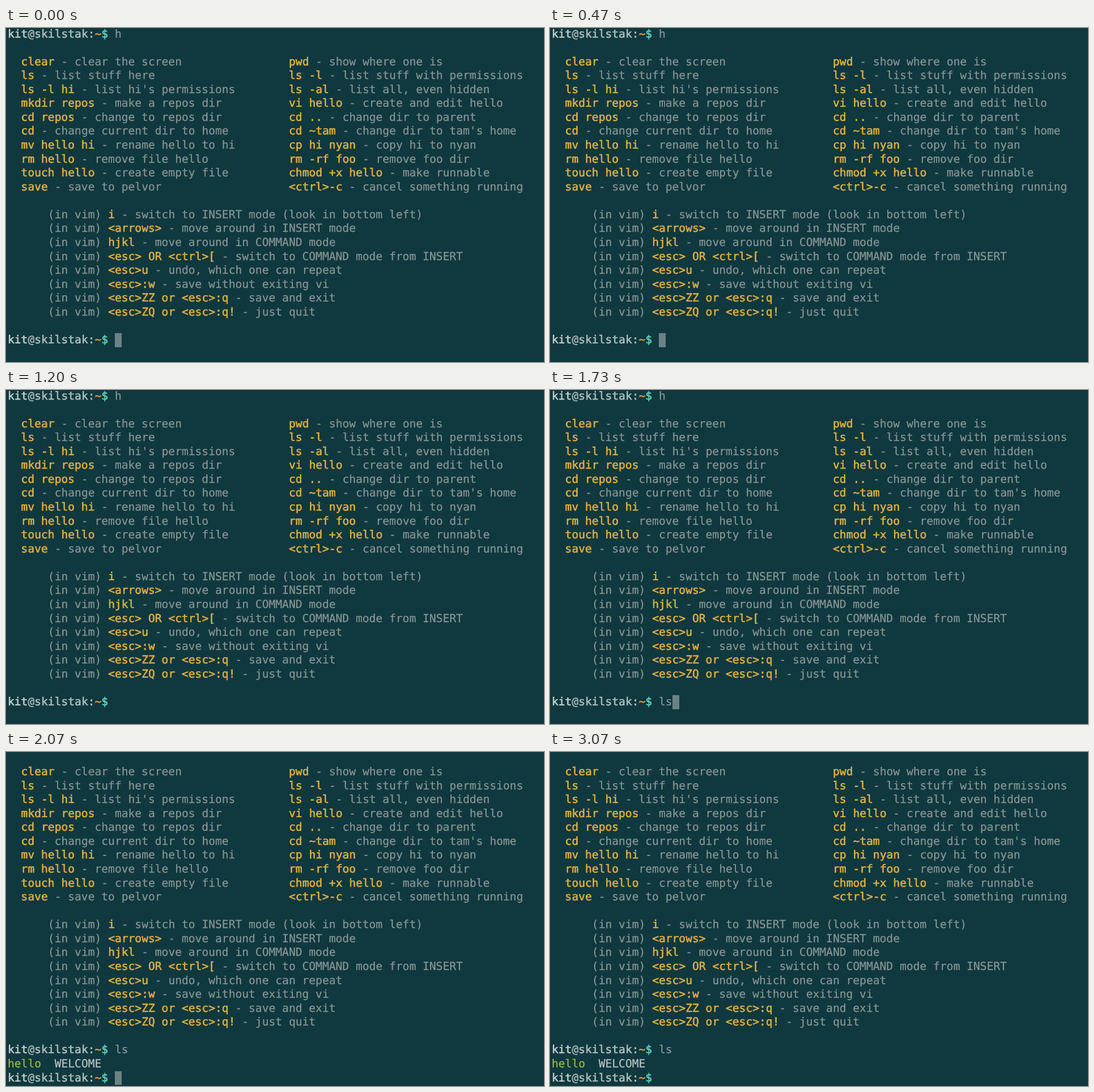
Recreate the animation shown at these times as an HTML page. Size 949 by 590 pixels, loop 3140 ms.

```html
<!DOCTYPE html>
<html lang="en">
<head>
<meta charset="utf-8">
<title>Terminal help</title>
<style>
  :root { --row: 24.57px; --col: 11.81px; --loop: 3140ms step-end infinite; }
  html, body { margin: 0; width: 100%; height: 100%; overflow: hidden; background: #10383f; }
  .stage { position: absolute; inset: 0; overflow: clip; contain: strict; }
  .screen {
    position: absolute; left: 3px; top: -1.5px; width: 940px; height: 580px;
    color: #86959a;
    color: #879694;
    font: 19.615px/var(--row) "DejaVu Sans Mono", "Liberation Mono", monospace;
    font-variant-ligatures: none;
    text-rendering: geometricPrecision;
    -webkit-text-stroke: .25px currentColor;
    animation: scroll var(--loop);
  }
  pre {
    position: absolute; margin: 0; font: inherit;
    left: calc(var(--x, 0) * var(--col));
    top: calc(var(--y, 0) * var(--row));
  }
  b { font-weight: 400; color: #dfb03f; -webkit-text-stroke: .6px currentColor; }
  .user { color: #c3d1cd; }
  .at { color: #9fb0ad; }
  .host { color: #afbfbb; }
  .dir { color: #dba03c; }
  .sign { color: #5fd9bf; }
  .exe { color: #98ba3c; -webkit-text-stroke-color: #98ba3c; }
  .file { color: #b9c4bf; -webkit-text-stroke-color: #b9c4bf; }
  .cursor {
    position: absolute; width: 12px; height: 24.5px; background: #6b8285;
    animation: blink var(--loop), move var(--loop);
  }
  .key1 { animation: key1 var(--loop); }
  .key2 { animation: key2 var(--loop); }
  .output { animation: output var(--loop); }

  /* ms: 930 cursor off, 1530 first key, 1670 second key, 1800 enter, 2730 cursor off */
  @keyframes blink {
    0%, 48.726% { visibility: visible; }
    29.618%, 86.943%, 100% { visibility: hidden; }
  }
  @keyframes move {
    0% { left: calc(16 * var(--col)); top: calc(22 * var(--row)); }
    48.726% { left: calc(17 * var(--col)); top: calc(22 * var(--row)); }
    53.185% { left: calc(18 * var(--col)); top: calc(22 * var(--row)); }
    57.325%, 100% { left: calc(16 * var(--col)); top: calc(24 * var(--row)); }
  }
  @keyframes key1 { 0% { visibility: hidden; } 48.726%, 100% { visibility: visible; } }
  @keyframes key2 { 0% { visibility: hidden; } 53.185%, 100% { visibility: visible; } }
  @keyframes output { 0% { visibility: hidden; } 57.325%, 100% { visibility: visible; } }
  @keyframes scroll {
    0% { top: -1.5px; }
    57.325%, 100% { top: calc(-1.5px - var(--row)); }
  }
</style>
</head>
<body>
<div class="stage">
<div class="screen">
<div class="cursor"></div>
<pre><b class="user">kit</b><b class="at">@</b><b class="host">skilstak:</b><b class="dir">~</b><b class="sign">$</b> h</pre>
<pre style="--x:2;--y:2"><b>clear</b> - clear the screen
<b>ls</b> - list stuff here
<b>ls -l hi</b> - list hi's permissions
<b>mkdir repos</b> - make a repos dir
<b>cd repos</b> - change to repos dir
<b>cd</b> - change current dir to home
<b>mv hello hi</b> - rename hello to hi
<b>rm hello</b> - remove file hello
<b>touch hello</b> - create empty file
<b>save</b> - save to pelvor</pre>
<pre style="--x:42;--y:2"><b>pwd</b> - show where one is
<b>ls -l</b> - list stuff with permissions
<b>ls -al</b> - list all, even hidden
<b>vi hello</b> - create and edit hello
<b>cd ..</b> - change dir to parent
<b>cd ~tam</b> - change dir to tam's home
<b>cp hi nyan</b> - copy hi to nyan
<b>rm -rf foo</b> - remove foo dir
<b>chmod +x hello</b> - make runnable
<b>&lt;ctrl&gt;-c</b> - cancel something running</pre>
<pre style="--x:6;--y:13">(in vim) <b>i</b> - switch to INSERT mode (look in bottom left)
(in vim) <b>&lt;arrows&gt;</b> - move around in INSERT mode
(in vim) <b>hjkl</b> - move around in COMMAND mode
(in vim) <b>&lt;esc&gt; OR &lt;ctrl&gt;[</b> - switch to COMMAND mode from INSERT
(in vim) <b>&lt;esc&gt;u</b> - undo, which one can repeat
(in vim) <b>&lt;esc&gt;:w</b> - save without exiting vi
(in vim) <b>&lt;esc&gt;ZZ or &lt;esc&gt;:q</b> - save and exit
(in vim) <b>&lt;esc&gt;ZQ or &lt;esc&gt;:q!</b> - just quit</pre>
<pre style="--y:22"><b class="user">kit</b><b class="at">@</b><b class="host">skilstak:</b><b class="dir">~</b><b class="sign">$</b> <span class="key1">l</span><span class="key2">s</span></pre>
<pre class="output" style="--y:23"><span class="exe">hello</span>  <span class="file">WELCOME</span>
<b class="user">kit</b><b class="at">@</b><b class="host">skilstak:</b><b class="dir">~</b><b class="sign">$</b></pre>
</div>
</div>
</body>
</html>
```
